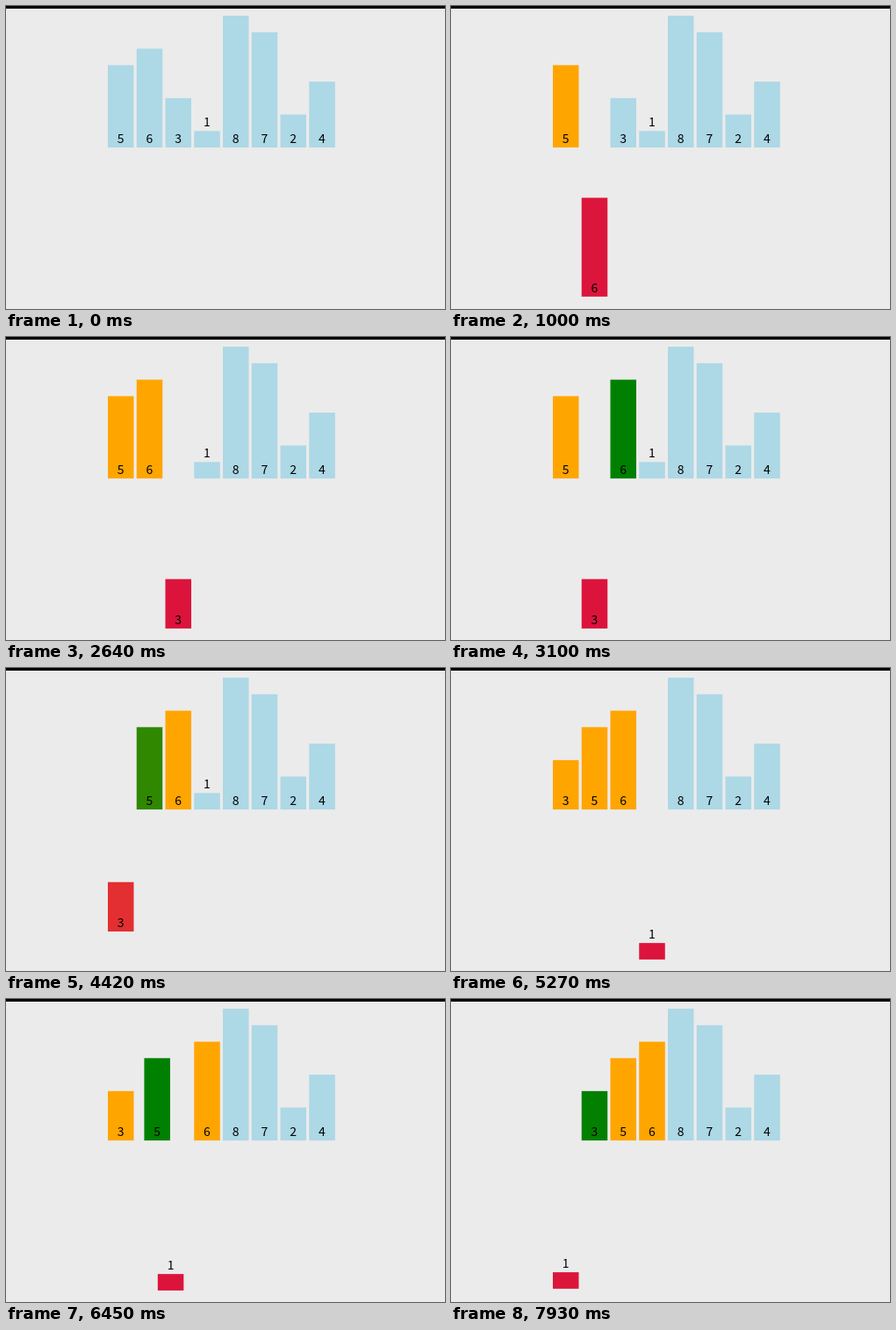
Animation of 500x345 px, one loop 7990 ms. Source, as an HTML page:

```html
<!DOCTYPE html>
<html lang="en">
<head>
<meta charset="utf-8">
<title>Insertion sort</title>
<style>
  html, body { margin: 0; width: 100%; height: 100%; overflow: hidden; background: #ebebeb; }
  svg { display: block; width: 500px; height: 345px; }
  text { font: 14px "Noto Sans CJK SC", "Noto Sans CJK JP", "Noto Sans", sans-serif; text-anchor: middle; }
</style>
</head>
<body>
<svg viewBox="0 0 500 345"><rect width="500" height="3"/></svg>
<script>
const LOOP = 7990;
const LEFT = 116, PITCH = 32.75, WIDTH = 29.5;
const BASE = 161.1, UNIT = 18.75, DROP = 170.8;
const BLUE = [173, 216, 230], ORANGE = [255, 165, 0], RED = [220, 20, 60], GREEN = [0, 128, 0];
const VALUES = [5, 6, 3, 1, 8, 7, 2, 4];

const settled = { color: ORANGE };
const compared = { color: GREEN };
const lifted = { color: RED, drop: 1 };
const placed = { color: ORANGE, drop: 0 };
const at = slot => ({ slot });

// [start, duration, { bar value: new state }]
const STEPS = [
  [190, 210, { 5: settled }],
  [815, 210, { 6: lifted }],
  [1025, 210, { 5: compared }],
  [1650, 290, { 6: placed, 5: settled }],
  [1940, 225, { 3: lifted }],
  [2620, 230, { 6: compared }],
  [2850, 230, { 6: at(2), 3: at(1) }],
  [3520, 215, { 6: settled, 5: compared }],
  [3735, 215, { 5: at(1), 3: at(0) }],
  [4340, 225, { 3: placed, 5: settled }],
  [4565, 225, { 1: lifted }],
  [5255, 235, { 6: compared }],
  [5490, 235, { 6: at(3), 1: at(2) }],
  [6135, 225, { 6: settled, 5: compared }],
  [6360, 225, { 5: at(2), 1: at(1) }],
  [7050, 230, { 5: settled, 3: compared }],
  [7280, 230, { 3: at(1), 1: at(0) }],
  [7898, 230, { 1: placed, 3: settled }]
];

const svg = document.querySelector("svg");
const add = (name, parent) =>
  parent.appendChild(document.createElementNS("http://www.w3.org/2000/svg", name));

const bars = VALUES.map((value, slot) => {
  const group = add("g", svg), rect = add("rect", group), label = add("text", group);
  const height = value * UNIT;
  rect.setAttribute("width", WIDTH);
  rect.setAttribute("height", height);
  rect.setAttribute("y", -height);
  label.setAttribute("x", WIDTH / 2);
  label.setAttribute("y", value === 1 ? -height - 5 : -5);
  label.textContent = value;
  return { value, slot, group, rect };
});

const ease = u => u < 0.5 ? 4 * u ** 3 : 1 - 4 * (1 - u) ** 3;
const mix = (a, b, p) => Array.isArray(a) ? a.map((v, i) => mix(v, b[i], p)) : a + (b - a) * p;

function draw(time) {
  for (const { value, slot, group, rect } of bars) {
    const state = { slot, drop: 0, color: BLUE };
    for (const [start, duration, changes] of STEPS) {
      if (time <= start) break;
      const p = ease(Math.min(1, (time - start) / duration));
      const goal = changes[value] || {};
      for (const key in goal) state[key] = mix(state[key], goal[key], p);
    }
    const x = LEFT + state.slot * PITCH, y = BASE + state.drop * DROP;
    group.setAttribute("transform", `translate(${x} ${y})`);
    rect.setAttribute("fill", `rgb(${state.color.map(Math.round)})`);
  }
}

const origin = performance.now();
function tick() {
  draw((performance.now() - origin) % LOOP);
  requestAnimationFrame(tick);
}
tick();
</script>
</body>
</html>
```
